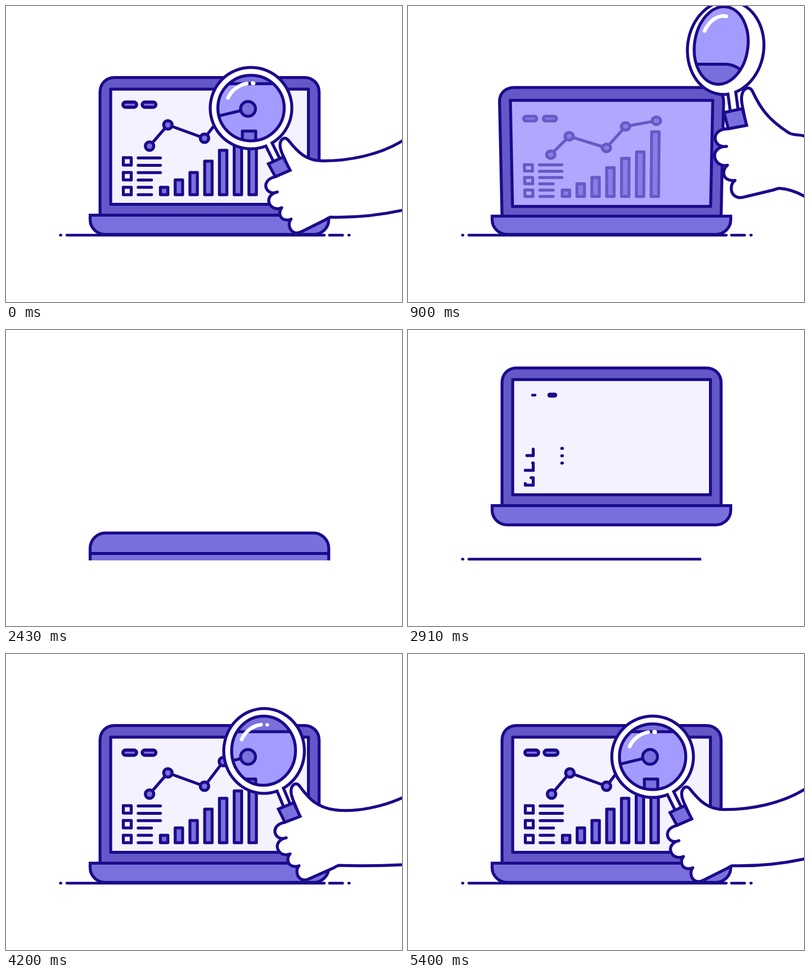
An HTML page with a canvas that plays this animation: 800x600 px, repeating every 5.43 s.

```html
<!DOCTYPE html>
<html>
<head>
<meta charset="utf-8">
<style>
html, body { margin: 0; width: 100%; height: 100%; overflow: hidden; background: #fff; }
canvas { display: block; }
</style>
</head>
<body>
<canvas id="stage" width="800" height="600"></canvas>
<script>
const ctx = document.getElementById('stage').getContext('2d');
const LOOP = 5430, GROUND = 464.5;
const NAVY = [27, 11, 140], MID = [122, 112, 221], PALE = [244, 242, 255], TINT = [176, 168, 255];
const LID = '#6458c9', GLASS = '#a49bff';

const lerp = (a, b, u) => a + (b - a) * u;
const clamp = u => Math.max(0, Math.min(1, u));
const span = (t, start, length) => clamp((t - start) / length);
const mix = (a, b, u) => `rgb(${a.map((v, i) => Math.round(lerp(v, b[i], u)))})`;
const rgb = c => mix(c, c, 0);
const backOut = u => 1 + 3.6 * (u - 1) ** 3 + 2.6 * (u - 1) ** 2;

// Path data whose coordinate pairs all go through a mapping
const remap = (d, map) => d.replace(/(-?[\d.]+) (-?[\d.]+)/g, (_, x, y) => map(+x, +y).join(' '));
const mapped = (d, map) => new Path2D(remap(d, map));
const box = (x1, y1, x2, y2) => `M${x1} ${y1} L${x2} ${y1} L${x2} ${y2} L${x1} ${y2} Z`;
const line = (x1, y1, x2, y2) => new Path2D(`M${x1} ${y1} L${x2} ${y2}`);

function oval(x, y, rx, ry, tilt = 0, from = 0, to = 2 * Math.PI) {
  const p = new Path2D();
  p.ellipse(x, y, rx, ry, tilt, from, to);
  return p;
}

function paint(path, fill, stroke = rgb(NAVY), width = 6) {
  if (fill) { ctx.fillStyle = fill; ctx.fill(path); }
  if (stroke) { ctx.strokeStyle = stroke; ctx.lineWidth = width; ctx.stroke(path); }
}

function drawGround(t) {
  let end = 700;
  if (t > 1740) end = lerp(697, 104, span(t, 1740, 540));
  if (t > 2310) end = lerp(104, 698, span(t, 2430, 585));
  ctx.save();
  ctx.beginPath();
  ctx.rect(0, 0, end, 600);
  ctx.clip();
  for (const [a, b] of [[110, 111], [123, 643], [653.5, 680], [692.5, 693.5]])
    paint(line(a, GROUND, b, GROUND), null, rgb(NAVY), 5.5);
  ctx.restore();
}

function drawChart(t, map, squash, ink, fill) {
  const w = 6;
  const intro = (start, length) => t < 1300 ? 1 : span(t, start, length);
  const shape = (d, f) => paint(mapped(d, map), f, ink, w);

  [250, 289].forEach((x, i) => {
    const p = intro(2870 - i * 35, 130), mid = x + 6 * (1 - p);
    if (!p) return;
    const bar = mapped(`M${mid - 8.5 * p} 200 L${mid + 8.5 * p} 200`, map);
    paint(bar, null, ink, 17 * p * squash);
    if (p > .8) paint(bar, null, fill, 4 * squash);
  });

  for (let i = 0; i < 3; i++) {
    const y = 315 + 30 * i, p = intro(2830 - 20 * i, 200);
    if (!p) continue;
    ctx.setLineDash([32 * p, 100]);
    const corner = `M253 ${y + 7.5} `;
    shape(corner + `L253 ${y - 7.5} L237 ${y - 7.5}`);
    shape(corner + `L237 ${y + 7.5} L237 ${y - 7.5}`);
    ctx.setLineDash([]);
  }

  for (let i = 0; i < 6; i++) {
    const p = intro(2905 + Math.max(0, i - 2) * 40, 200), right = i < 3 ? 312 : 294;
    const y = 308 + 14.9 * i;
    if (p) shape(`M${right} ${y} L${lerp(right, 267, p)} ${y}`);
  }

  [15, 30, 45, 68, 90, 105, 152].forEach((h, i) => {
    const u = intro(3165 + 60 * i, 500), x = 319.5 + 29.8 * i;
    if (u) shape(box(x - 7.5, 382.5 - h * backOut(u), x + 7.5, 382.5), fill);
  });

  const pts = [[290, 284], [327, 241], [401, 268], [439, 218], [500, 205]];
  let left = 261 * intro(3270, 420);
  for (let i = 1; i < 5 && left > 0; i++) {
    const [x1, y1] = pts[i - 1], [x2, y2] = pts[i];
    const len = Math.hypot(x2 - x1, y2 - y1), u = Math.min(1, left / len);
    shape(`M${x1} ${y1} L${lerp(x1, x2, u)} ${lerp(y1, y2, u)}`);
    left -= len;
  }
  pts.forEach(([x, y], i) => {
    const p = intro(3320 + 80 * i, 250);
    if (p) paint(oval(...map(x, y), 8.5 * p, 8.5 * p * squash), fill, ink, w * Math.min(1, p * 2));
  });
}

function drawLaptop(t) {
  if (t > 1700 && t < 2310) return;
  // fold runs forward while closing and backward while opening
  let fold = t < 1800 ? t : 0, dy = 0;
  if (t >= 2310) {
    if (t < 2850) fold = lerp(1700, 513, span(t, 2310, 540));
    dy = -68 * (1 - (1 - span(t, 2440, 440)) ** 2);
    if (t > 2910) dy = -68 * (1 - span(t, 2910, 230) ** 2);
  }
  const deg = Math.min(90, 26 * (Math.max(0, fold - 513) / 387) ** 2);
  const angle = deg * Math.PI / 180, squash = Math.cos(angle), lean = deg / 26;
  const hinge = 424 + deg / 13;
  const flip = span(fold, 1233, 170), sink = 62 * span(fold, 1410, 290) ** 2;

  ctx.save();
  ctx.translate(0, dy);
  ctx.beginPath();
  ctx.rect(0, -100, 800, 567);
  ctx.clip();

  if (deg < 90) {
    const map = (x, y) => {
      const k = 1 + .058 * Math.sin(angle) * (424 - y) / 279;
      return [411 + (x - 411) * k, hinge - (424 - y) * squash * k];
    };
    const lidMap = (x, y) => {
      const [u, v] = map(x, y);
      return [u, v - 5 * Math.sin(2 * angle) * (424 - y) / 279];
    };
    const chartMap = (x, y) => map(x, 382.5 - 3 * lean - (382.5 - y) * (1 - .06 * lean));
    const dim = span(fold, 600, 300), back = dim ? TINT : PALE;
    const fade = .5 * dim + .5 * span(fold, 900, 330);
    paint(mapped('M190 424 L190 175 C190 157 202 145 220 145 L602 145 C620 145 632.5 157 632.5 175 L632.5 424 Z', lidMap), LID);
    paint(mapped(box(211.5, 168.5, 611, 402), map), mix(PALE, TINT, dim));
    if (t < 1233 || t > 2800)
      drawChart(t, chartMap, squash, mix(NAVY, back, fade), mix(MID, back, fade * fade));
  }

  const top = lerp(hinge, 411, flip) + sink, bottom = lerp(463, 480, flip) + sink;
  const base = new Path2D(), rt = 31 * flip, rb = 30 * (1 - flip);
  base.roundRect(170, top, 482, bottom - top, [rt, rt, rb, rb]);
  ctx.lineJoin = 'miter';
  paint(base, rgb(MID));
  const seam = lerp(hinge, 452.5, flip) + sink;
  if (flip) paint(line(171, seam, 651, seam));
  ctx.restore();
}

// time, thumb x y, turn, scale, ring x y rx ry, glass shift, glass rx, arm x y, arm ends
const rest = [0, 561, 267, 0, 1, 495, 207, 82.5, 82.5, 0, 67, 640, 314, 270, 413];
function nudge(time, dx, dy, turn) {
  const add = [time, dx, dy, turn, 0, dx, dy, 0, 0, 0, 0, dx, dy, dy, dy];
  return rest.map((v, i) => v + add[i]);
}
const poses = [
  nudge(4850 - LOOP, -4, 19, -1),
  rest,
  nudge(570, 30, -33, 3),
  [900, 686, 165, 13, 1.15, 641, 85, 77, 95, -9, 54, 768, 257, 266, 389],
  [1140, 1000, 0, 24, 1.4, 950, -100, 60, 105, -10, 40, 1080, 90, 90, 230],
  [3450, 1050, 330, 30, 1.6, 1100, 200, 40, 100, -10, 22, 1150, 430, 400, 600],
  [3660, 860, 224, 28, 1.59, 930, 110, 50, 102, -10, 30, 960, 340, 310, 520],
  [3960, 662, 234, 7, 1.06, 606, 164, 79, 91, -4, 59, 743, 306, 292, 438],
  [4200, 584, 262, 2.4, 1.01, 521.5, 196.5, 81.5, 86, -1, 64.5, 665, 316, 289, 427],
  nudge(4850, -4, 19, -1),
  nudge(LOOP, 0, 0, 0),
  nudge(LOOP + 570, 30, -33, 3)
];

// Smooth curve through the poses
function poseAt(t) {
  let i = 1;
  while (poses[i + 1][0] <= t) i++;
  const [a, b, c, d] = poses.slice(i - 1, i + 3), gap = c[0] - b[0], u = (t - b[0]) / gap;
  return b.map((v, k) => {
    const m1 = (c[k] - a[k]) / (c[0] - a[0]) * gap, m2 = (d[k] - b[k]) / (d[0] - b[0]) * gap;
    return (2 * u ** 3 - 3 * u * u + 1) * v + (u ** 3 - 2 * u * u + u) * m1
      + (3 * u * u - 2 * u ** 3) * c[k] + (u ** 3 - u * u) * m2;
  });
}

function drawGlass(x, y, rx, ry, tilt, turn) {
  const glass = oval(x, y, rx, ry, tilt);
  ctx.save();
  ctx.clip(glass);
  paint(glass, GLASS, null);
  const rim = new Path2D();
  rim.roundRect(350, 118, 340, 39.5 + Math.max(0, 170 - y) * .5, [0, 50, 0, 0]);
  paint(rim, rgb(MID));
  paint(line(400, 230, 489, 208.5));
  paint(oval(489, 208.5, 15, 15), rgb(MID));
  paint(new Path2D(box(477.5, 253.5, 504.5, 330)), rgb(MID));
  ctx.restore();
  paint(glass);

  const shine = (from, to, width) => paint(
    oval(x, y, rx * .76, ry * .76, tilt, from * Math.PI / 180, to * Math.PI / 180), null, '#fff', width);
  shine(204, 260 + turn, 7.5);
  const dot = 1 - turn / 12;
  if (dot > 0) shine(274 + turn, 275.5 + turn, 8 * dot);
}

function drawHand(t) {
  if (t > 1140 && t < 3450) return;
  const [, hx, hy, turn, s, ox, oy, orx, ory, shift, grx, px, py, e1, e2] = poseAt(t);
  const a = turn * Math.PI / 180, c = Math.cos(a), n = Math.sin(a);
  const slim = 1 - Math.max(0, turn - 13) * .023;
  const map = (x, y) => {
    x -= 561; y -= 267;
    return [hx + (x * c - y * n) * s * slim, hy + (x * n + y * c) * s];
  };

  const tilt = a * .6, rod = line(ox, oy, ...map(547, 313));
  ctx.lineCap = 'butt';
  paint(rod, null, rgb(NAVY), 14 * s + 6);
  paint(oval(ox, oy, orx + 3, ory + 3, tilt), rgb(NAVY), null);
  paint(oval(ox, oy, orx - 3, ory - 3, tilt), '#fff', null);
  paint(rod, null, '#fff', 14 * s - 6);
  ctx.lineCap = 'round';
  drawGlass(ox + shift, oy + shift * .5, grx, ory - 16, tilt, turn);

  const ex = Math.max(806, px + 30), d = .3 * (ex - px);
  const [tx, ty] = map(607, 314), slope = (py - ty) / (px - tx);
  const [wx, wy] = map(655, 428);
  // arm, thumb, four fingers, heel of the hand, arm
  const hand = new Path2D(
    `M${ex} ${e1} C${ex - d} ${lerp(e1, py, .75)} ${px + d} ${py + d * slope} ${px} ${py} `
    + remap('C607 314 590 297 571 273 C563 262 552 271 554 286 C555 294 558 300 562 308 '
    + 'L573 333 L544 346 C528 350 522 360 526 370 C531 380 541 380 548 377 '
    + 'C534 380 526 392 534 404 C542 414 553 411 557 409 C550 418 553 430 562 433 '
    + 'C569 435 574 433 576 432 C569 440 572 455 582 459 C590 462 596 458 602 455 '
    + 'L646 433 Q650 430 ', map)
    + `${wx} ${wy} Q${(wx + ex) / 2} ${wy + 2} ${ex} ${e2}`);
  paint(hand, '#fff');
  ctx.lineJoin = 'miter';
  paint(mapped('M530 320 L560 306 L574 333 L544 346 Z', map), rgb(MID));
}

function frame(t) {
  ctx.fillStyle = '#fff';
  ctx.fillRect(0, 0, 800, 600);
  ctx.lineCap = ctx.lineJoin = 'round';
  drawLaptop(t);
  drawGround(t);
  drawHand(t);
}

const start = performance.now();
(function tick() {
  frame((performance.now() - start) % LOOP);
  requestAnimationFrame(tick);
})();
</script>
</body>
</html>
```
